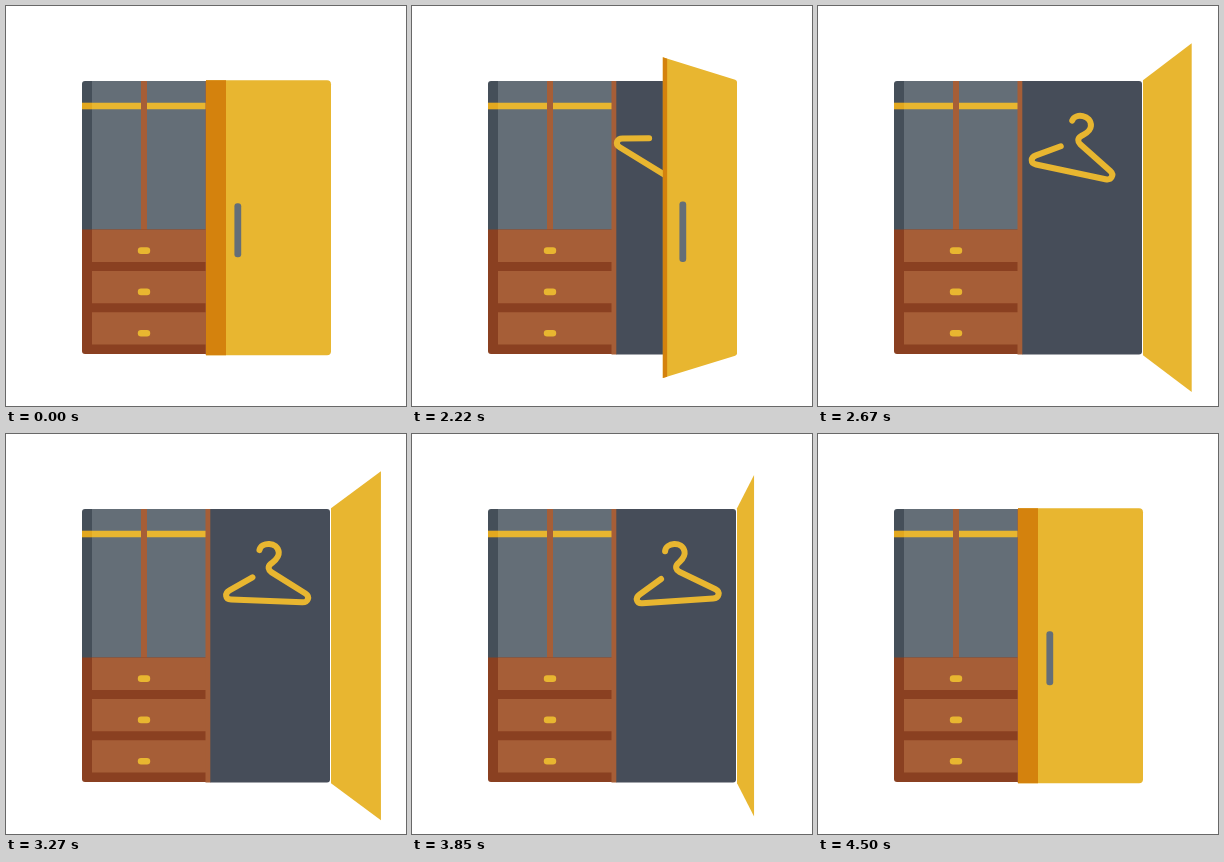
An HTML page with a canvas that plays this animation: 400x400 px, repeating every 4520 ms.

```html
<!DOCTYPE html>
<html lang="en">
<head>
<meta charset="utf-8">
<title>Wardrobe</title>
<style>
  html, body { margin: 0; width: 100%; height: 100%; overflow: hidden; background: #fff; }
  canvas { display: block; width: 100vw; height: 100vh; }
</style>
</head>
<body>
<canvas id="stage" width="400" height="400"></canvas>
<script>
const ctx = document.getElementById('stage').getContext('2d');
const LOOP = 4520;
const COLOR = {
  yellow: '#e8b630', amber: '#d4820d', rodShade: '#e2a81f',
  wood: '#a65e37', woodDark: '#8a4021',
  slate: '#646e77', slateDark: '#454f59', inside: '#464d59'
};

// Time in ms, angle in degrees.
const DOOR_KEYS = [
  [2020, 0], [2110, 25], [2230, 51], [2370, 72.3], [2520, 90.4], [2670, 95.5], [2740, 95.9],
  [3500, 95.9], [3650, 94.8], [3850, 85.2], [4185, 32], [4500, 0]
];
const HANGER_KEYS = [[2020, 34], [2370, 29], [2670, 12], [3270, 2.3], [3850, -3.9], [4400, -6]];

const HANGER = new Path2D(
  'M-9.7-3.5C-8.5-12 8-13 9.7-2C10.5 4 5 7 2 10C-1 13 0 16 3 18' +
  'L38 38C43 41 41 47 35 47L-36 47C-42 47-43 41-38 38L-15.6 24'
);

// Monotone cubic interpolation through the keys.
function sample(keys, t) {
  const last = keys.length - 1;
  if (t <= keys[0][0]) return keys[0][1];
  if (t >= keys[last][0]) return keys[last][1];
  const slope = i => (keys[i + 1][1] - keys[i][1]) / (keys[i + 1][0] - keys[i][0]);
  const tangent = i => {
    if (i === 0) return slope(0);
    if (i === last) return slope(last - 1) * 0.5;
    const a = slope(i - 1), b = slope(i);
    return a * b <= 0 ? 0 : 2 * a * b / (a + b);
  };
  const i = keys.findIndex(k => k[0] > t) - 1;
  const [t0, v0] = keys[i], [t1, v1] = keys[i + 1];
  const h = t1 - t0, u = (t - t0) / h, w = 1 - u;
  return v0 * (1 + 2 * u) * w * w + v1 * u * u * (3 - 2 * u) +
    h * u * w * (tangent(i) * w - tangent(i + 1) * u);
}

function box(color, x0, y0, x1, y1, radii = 0) {
  ctx.fillStyle = color;
  ctx.beginPath();
  ctx.roundRect(x0, y0, x1 - x0, y1 - y0, radii);
  ctx.fill();
}

function drawCabinet() {
  box(COLOR.slate, 85, 75, 201, 224);
  box(COLOR.slateDark, 76, 75, 86, 224, [3, 0, 0, 0]);
  box(COLOR.yellow, 86, 96.7, 200, 103.3);
  box(COLOR.rodShade, 76, 96.7, 86, 103.3);
  box(COLOR.wood, 135, 75, 141, 224);
  box(COLOR.woodDark, 76, 223.5, 201, 348, [0, 0, 0, 3]);
  for (let i = 0; i < 3; i++) {
    const y = 223.7 + i * 41.3;
    box(COLOR.wood, 86, y, 200, y + 32.3);
    box(COLOR.yellow, 131.8, y + 17.6, 144.2, y + 24.2, 3.2);
  }
  box(COLOR.inside, 204, 75, 324, 348.5, [0, 3, 3, 0]);
  box(COLOR.wood, 199.5, 75, 204.3, 348.5);
}

function drawHanger(degrees) {
  ctx.save();
  ctx.translate(263, 120);
  ctx.rotate(degrees * Math.PI / 180);
  ctx.strokeStyle = COLOR.yellow;
  ctx.lineWidth = 6;
  ctx.lineCap = ctx.lineJoin = 'round';
  ctx.stroke(HANGER);
  ctx.restore();
}

function drawDoor(degrees) {
  const width = 125, half = 137.5, midY = 211.7, hinge = 325, eyeX = 200;
  const a = degrees * Math.PI / 180;
  const depth = (0.188 + 0.024 * Math.max(0, (degrees - 72) / 23.4) ** 2) * Math.sin(a);

  // u is the distance from the hinge along the door.
  const project = u => {
    const scale = 1 / (1 - depth * u / width);
    return { x: eyeX + (hinge - eyeX - u * Math.cos(a)) * scale, scale };
  };
  const edge = project(width);
  const reach = half * edge.scale;
  const corner = 4 * Math.max(0, Math.cos(a));

  ctx.fillStyle = COLOR.yellow;
  ctx.beginPath();
  ctx.moveTo(edge.x, midY - reach);
  ctx.arcTo(hinge, midY - half, hinge, midY, corner);
  ctx.arcTo(hinge, midY + half, edge.x, midY + reach, corner);
  ctx.lineTo(edge.x, midY + reach);
  ctx.fill();

  const sideWidth = 20 * Math.max(0, 1 - degrees / 72);
  if (sideWidth > 0) {
    const side = project(width - sideWidth);
    const sideReach = half * side.scale;
    ctx.fillStyle = COLOR.amber;
    ctx.beginPath();
    ctx.moveTo(edge.x, midY - reach);
    ctx.lineTo(side.x, midY - sideReach);
    ctx.lineTo(side.x, midY + sideReach);
    ctx.lineTo(edge.x, midY + reach);
    ctx.fill();
  }

  if (degrees < 80) {
    const grip = project(93.2);
    const x = grip.x - 1.5 * Math.sin(a);
    const y = midY + 12.5 * grip.scale, h = 27 * grip.scale;
    box(COLOR.slate, x - 3.4, y - h, x + 3.4, y + h, 3);
  }
}

function draw(t) {
  ctx.fillStyle = '#fff';
  ctx.fillRect(0, 0, 400, 400);
  drawCabinet();
  drawHanger(sample(HANGER_KEYS, t));
  drawDoor(sample(DOOR_KEYS, t));
}

const start = performance.now();
function frame() {
  draw((performance.now() - start) % LOOP);
  requestAnimationFrame(frame);
}
frame();
</script>
</body>
</html>
```
